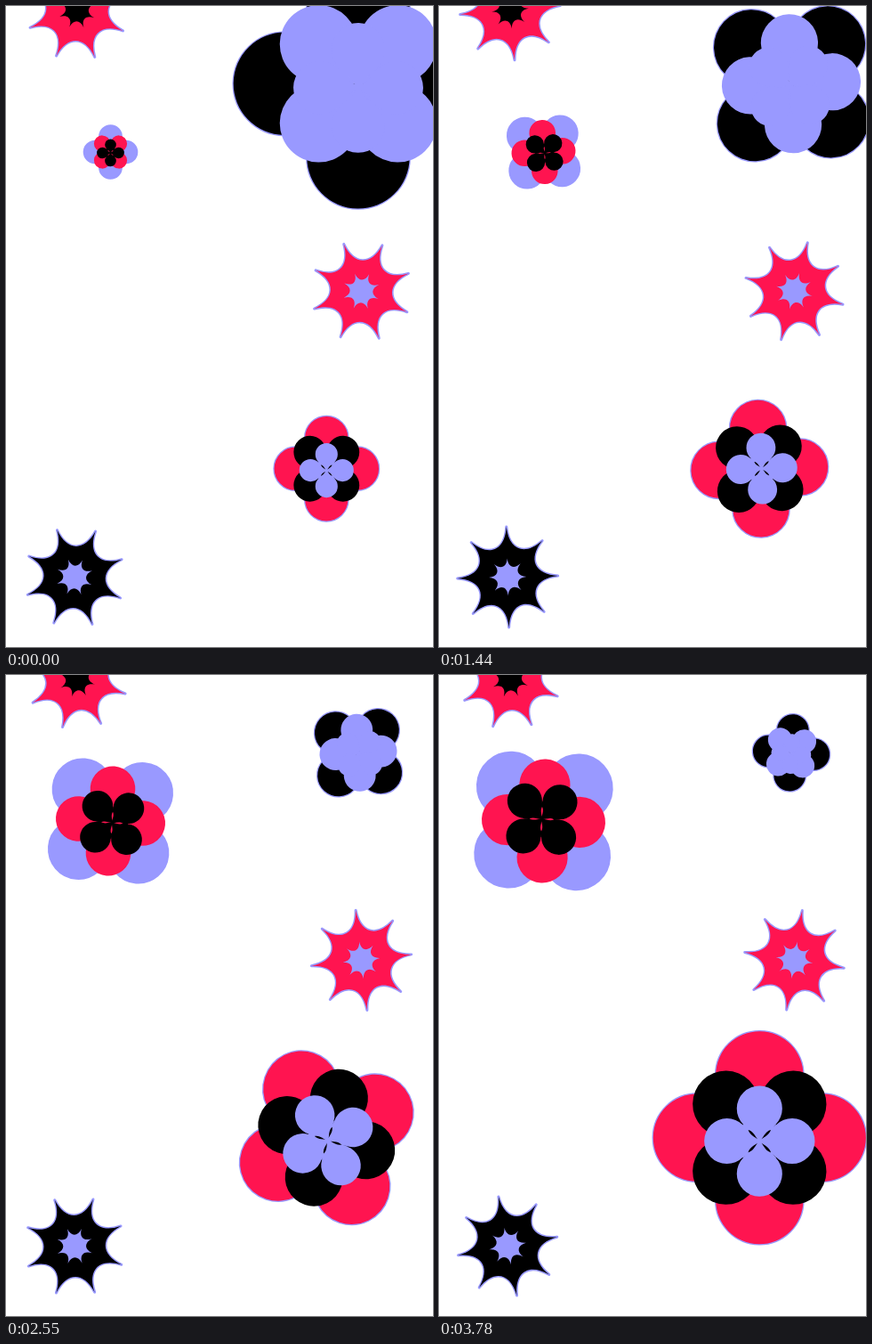
An HTML page with a canvas for the animation above (3810 ms loop, 480 by 720 pixels).

```html
<!DOCTYPE html>
<html>
<head>
<meta charset="utf-8">
<style>
  html, body { margin: 0; width: 480px; height: 720px; overflow: hidden; background: #fff; }
  canvas { display: block; }
</style>
</head>
<body>
<canvas id="stage" width="480" height="720"></canvas>
<script>
const ctx = document.getElementById('stage').getContext('2d');
const RED = '#ff1450', LILAC = '#9999ff', BLACK = '#000';
const LOOP = 3810, STEP = 30, HOLD = 60;
const RAD = Math.PI / 180;

// Step numbers at which the spins below are given, in degrees.
const KEYS = [0, 21, 36, 55, 71, 95, 124];

const flowers = [
  { x: 396, y: 87.3, colors: [BLACK, LILAC, LILAC], mid: 53.6, swing: 29.2, from: -4, half: 118,
    spin: [0, -83, -213, -420, -616, -898, -1076] },
  { x: 117.5, y: 164, colors: [LILAC, RED, BLACK], mid: 35.9, swing: -19, from: 8, half: 105,
    spin: [0, -15, 7, -133, -275, -499, -583] },
  { x: 360.3, y: 519.7, colors: [RED, BLACK, LILAC], mid: 52.5, swing: -17.9, from: 0, half: 125,
    spin: [0, 64, 175, 361, 545, 830, 1080] }
];

const stars = [
  { x: 80, y: 4.5, colors: [RED, BLACK], spin: [0, -11, -80, -157, -245, -307, -409.5] },
  { x: 399.5, y: 320.3, colors: [RED, LILAC], spin: [0, -38, -100.5, -184.5, -257.5, -339.5, -420.5] },
  { x: 77.2, y: 641.5, colors: [BLACK, LILAC], spin: [0, -40.7, -86, -143.5, -195.5, -260, -350] }
];

// Monotone cubic through the spin keys, starting from rest.
function spinAt(spin, step) {
  const last = KEYS.length - 1;
  const secant = k => (spin[k + 1] - spin[k]) / (KEYS[k + 1] - KEYS[k]);
  const slope = k => {
    if (k === 0) return 0;
    if (k === last) return secant(last - 1) * 0.6;
    const a = secant(k - 1), b = secant(k);
    return a * b > 0 ? 2 * a * b / (a + b) : 0;
  };
  let k = 0;
  while (k < last - 1 && step > KEYS[k + 1]) k++;
  const w = KEYS[k + 1] - KEYS[k];
  const u = (step - KEYS[k]) / w, v = 1 - u;
  return spin[k] * (1 + 2 * u) * v * v + slope(k) * w * u * v * v
       + spin[k + 1] * (3 - 2 * u) * u * u - slope(k + 1) * w * u * u * v;
}

// Four round petals that leave thin lens-shaped gaps near the centre.
function petals(dist, turn) {
  const r = dist * 0.698, reach = Math.sqrt(dist * dist - r * r);
  const edge = Math.asin(r / dist);
  const path = new Path2D();
  for (let k = 0; k < 4; k++) {
    const a = turn + k * Math.PI / 2;
    const at = (len, deg) => [dist * len * Math.cos(a + deg * RAD), dist * len * Math.sin(a + deg * RAD)];
    path.moveTo(0, 0);
    path.bezierCurveTo(...at(0.15, -55), ...at(0.33, -27), ...at(0.5, -45.3));
    path.lineTo(...at(reach / dist, -45.3));
    path.arc(...at(1, 0), r, a - edge - Math.PI / 2, a + edge + Math.PI / 2);
    path.lineTo(...at(0.5, 45.3));
    path.bezierCurveTo(...at(0.33, 27), ...at(0.15, 55), 0, 0);
  }
  return path;
}

// Eight sharp tips joined by hollow curves.
function starPath(size) {
  const path = new Path2D();
  for (let k = 0; k < 8; k++) {
    const a = k * 45 * RAD;
    const at = (len, deg) => [size * len * Math.cos(a + deg * RAD), size * len * Math.sin(a + deg * RAD)];
    if (k === 0) path.moveTo(...at(1, 0));
    path.bezierCurveTo(...at(0.535, 4.4), ...at(0.535, 40.6), ...at(1, 45));
  }
  path.closePath();
  return path;
}

const outerStar = starPath(56.5), innerStar = starPath(21);

function paint(path, fill, outline) {
  if (outline) {
    ctx.strokeStyle = LILAC;
    ctx.lineWidth = outline;
    ctx.stroke(path);
  }
  ctx.fillStyle = fill;
  ctx.fill(path, 'nonzero');
}

function place(item, angle, draw) {
  ctx.save();
  ctx.translate(item.x, item.y);
  ctx.rotate(angle * RAD);
  draw();
  ctx.restore();
}

function drawFlower(f, step) {
  const d = f.mid + f.swing * Math.cos(Math.PI * (step - f.from) / f.half);
  place(f, spinAt(f.spin, step), () => {
    paint(petals(d, 0), f.colors[0], 2.4);
    paint(petals(d * 0.76, Math.PI / 4), f.colors[1]);
    ctx.translate(0, d * 0.055);
    paint(petals(d * 0.52, 0), f.colors[2]);
  });
}

function drawStar(s, step) {
  place(s, 24.5 + spinAt(s.spin, step), () => {
    paint(outerStar, s.colors[0], 3);
    paint(innerStar, s.colors[1]);
  });
}

function render(ms) {
  const step = Math.max(0, Math.floor(((ms % LOOP) - HOLD) / STEP));
  ctx.fillStyle = '#fff';
  ctx.fillRect(0, 0, 480, 720);
  ctx.lineJoin = 'round';
  stars.forEach(s => drawStar(s, step));
  flowers.forEach(f => drawFlower(f, step));
}

const start = performance.now();
function tick() {
  render(performance.now() - start);
  requestAnimationFrame(tick);
}
tick();
</script>
</body>
</html>
```
